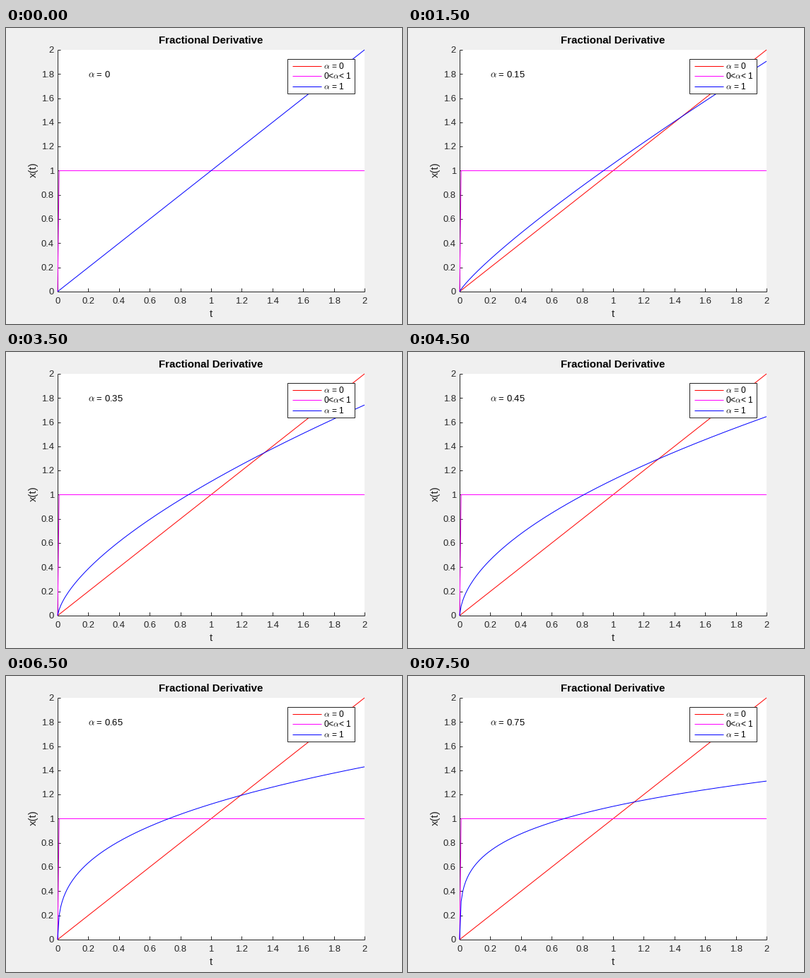
Animation, 560 px wide and 420 px high, one loop 8 s. Source, as a matplotlib script:

```python
import numpy as np
import matplotlib.pyplot as plt
from matplotlib.animation import FuncAnimation
from matplotlib.patches import Rectangle

plt.rcParams["font.family"] = "Liberation Sans"
plt.rcParams["mathtext.fontset"] = "cm"
plt.rcParams["lines.solid_capstyle"] = "butt"

W, H, DPI = 560, 420, 80
PT = 72 / DPI  # points per pixel
LEFT, RIGHT, TOP, BOTTOM = 73, 507, 31, 374
INK = "#262626"
RED, MAGENTA, BLUE = "#ff0000", "#ff00ff", "#0000ff"
FRAMES, STEP = 16, 0.05

fig = plt.figure(figsize=(W / DPI, H / DPI), dpi=DPI, facecolor="#f0f0f0")
ax = fig.add_axes([0, 0, 1, 1])
ax.set_xlim(0, W)
ax.set_ylim(H, 0)
ax.axis("off")


def px(t):
    return LEFT + t * (RIGHT - LEFT) / 2


def py(x):
    return BOTTOM - x * (BOTTOM - TOP) / 2


def line(x, y, color, z):
    return ax.plot(x, y, color=color, lw=PT, zorder=z)[0]


def label(x, y, s, size=13, color=INK, ha="center", z=6, **kw):
    return ax.text(x, y, s, fontsize=size * PT, color=color, ha=ha,
                   va="baseline", zorder=z, **kw)


def box(x, y, w, h, z, edge="none"):
    ax.add_patch(Rectangle((x, y), w, h, fc="white", ec=edge, lw=PT, zorder=z))


def fractional(alpha):
    """Grunwald-Letnikov derivative of x(t) = t on the grid n * h."""
    n = np.arange(2, N + 1)
    ratio = np.concatenate([[1], (n - alpha) / (n - 1)])
    return np.concatenate([[0], h ** (1 - alpha) * np.cumprod(ratio)])


# Axes, below the curves
box(LEFT, TOP, RIGHT - LEFT, BOTTOM - TOP, 0)
line([LEFT, LEFT], [TOP, BOTTOM], INK, 1)
line([LEFT, RIGHT], [BOTTOM, BOTTOM], INK, 1)
for v in np.arange(11) / 5:
    x, y = np.round(px(v)), np.round(py(v))
    line([x, x], [BOTTOM, BOTTOM - 5], INK, 1)
    line([LEFT, LEFT + 4], [y, y], INK, 1)
    label(px(v), 391, f"{v:g}")
    label(68, py(v) + 4.2, f"{v:g}", ha="right")

label(290, 22, "Fractional Derivative", 15, "black", weight="bold")
label(290, 410, "t", 15)
label(43, 201, "x(t)", 15, rotation=90, rotation_mode="anchor")

# Curves
N, h = 200, 0.01
t = np.arange(N + 1) * h
ramp = line(px(t), py(t), RED, 2)
line(px(t), py(np.where(t > 0, 1, 0)), MAGENTA, 3)
curve = line(px(t), py(t), BLUE, 4)
note = label(116, 70, "", color="black", ha="left")

# Legend
box(398, 44, 95, 49, 5, INK)
entries = [(54, 58, RED, r"$\alpha$ = 0"),
           (68, 72, MAGENTA, r"0<$\alpha$< 1"),
           (83, 87, BLUE, r"$\alpha$ = 1")]
for y, base, color, s in entries:
    line([405, 446], [y, y], color, 6)
    label(449, base, s, 12, "black", "left", 7)


def update(k):
    alpha = k * STEP
    curve.set_ydata(py(fractional(alpha)))
    ramp.set_visible(alpha > 0)  # fully covered while the lines coincide
    note.set_text(rf"$\alpha$ = {alpha:g}")
    return curve, ramp, note


anim = FuncAnimation(fig, update, frames=FRAMES, interval=500,
                     repeat=True, repeat_delay=0)
plt.show()
```
